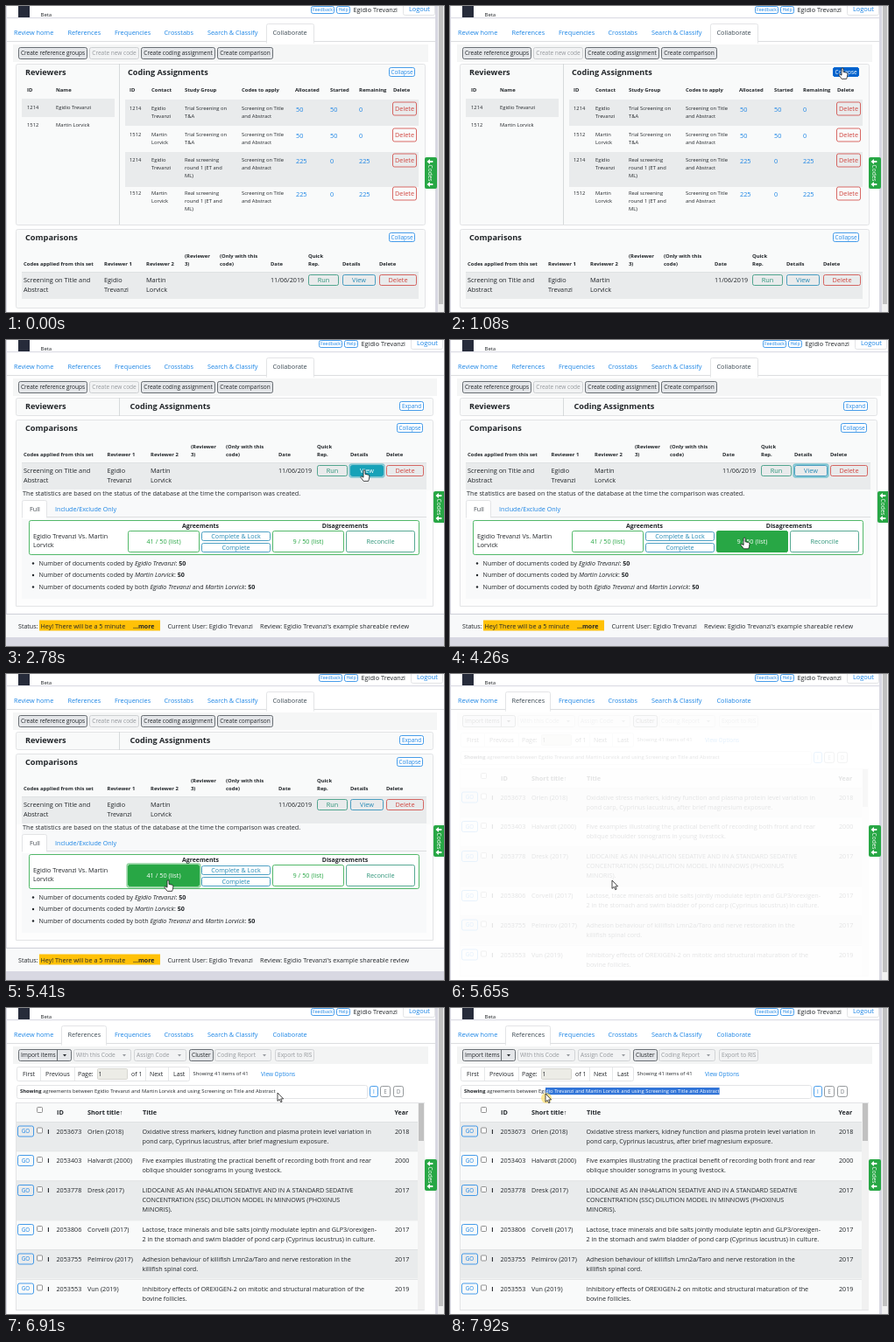
These frames come from a looping animation (500 px wide and 350 px high, 8 s). An HTML page:

```html
<!DOCTYPE html>
<html lang="en">
<head>
<meta charset="utf-8">
<title>Review screens</title>
<style>
html, body { margin: 0; width: 100%; height: 100%; overflow: hidden; background: #d8d8e2; }
svg { display: block; width: 500px; height: 350px; }
text { font-family: "Open Sans", "Noto Sans", sans-serif; white-space: pre; }
</style>
</head>
<body>
<svg id="stage" viewBox="0 0 500 350" xmlns="http://www.w3.org/2000/svg"></svg>
<script>
const INK = '#212529', BLUE = '#1a84e5', TEAL = '#2389b5', GREEN = '#28a745', RED = '#d0453f';
const LINE = '#dcdee0', SHADE = '#e9ebec', PALE = '#f9fafa';
const ANN = ['Egidio', 'Trevanzi'], BOB = ['Martin', 'Lorvick'];
const annName = ANN.join(' '), bobName = BOB.join(' ');
const LOOP = 8000;

// y is the vertical middle of the capitals
const text = (x, y, s, size = 7.3, fill = INK, extra = '') =>
  `<text x="${x}" y="${(y + size * 0.36).toFixed(2)}" font-size="${size}" fill="${fill}" ${extra}>${s}</text>`;
const bold = (x, y, s, size = 5.9, extra = '') => text(x, y, s, size, INK, 'font-weight="700" ' + extra);
const mid = (x, y, s, size, fill) => text(x, y, s, size, fill, 'text-anchor="middle"');
const lines = (x, y, list, gap, size) => list.map((s, i) => text(x, y + i * gap, s, size)).join('');
const rect = (x, y, w, h, fill, stroke = 'none', r = 0) => stroke === 'none'
  ? `<rect x="${x}" y="${y}" width="${w}" height="${h}" rx="${r}" fill="${fill}"/>`
  : `<rect x="${x + .5}" y="${y + .5}" width="${w - 1}" height="${h - 1}" rx="${r}" fill="${fill}" stroke="${stroke}" stroke-width=".8"/>`;
const button = (x, y, w, h, label, color, size = 7.3, fill = '#fff', ink = color) =>
  rect(x, y, w, h, fill, color, 2) + mid(x + w / 2, y + h / 2, label, size, ink);
const solid = (x, y, w, h, label, color, size) => button(x, y, w, h, label, color, size, color, '#fff');
const ring = (x, y, w, h, color) =>
  `<rect x="${x - .8}" y="${y - .8}" width="${w + 1.6}" height="${h + 1.6}" rx="2.6" fill="none" stroke="${color}" stroke-opacity=".5" stroke-width="1.7"/>`;
const caret = (x, y, fill) => `<path d="M${x} ${y}h4l-2 2.4z" fill="${fill}"/>`;
const group = (id, body, extra = '') => `<g id="${id}" ${extra}>${body}</g>`;

const TABS = [['Review home', 9], ['References', 70.5], ['Frequencies', 124], ['Crosstabs', 180.5],
  ['Search &amp; Classify', 230], ['Collaborate', 304.5]];

function chrome(w, active, bottom) {
  const d = w === 500 ? 9 : 0;
  const [tx, tw] = active === 1 ? [63, 52] : [297, 55];
  return rect(0, 0, 500, 350, '#d8d8e2') + rect(1, 0, w - 1, bottom, '#fff')
    + rect(0, 13, w, 1.2, '#dcdce5')
    + rect(14, 0, 13, 13, '#262b3a') + text(39.5, 9.5, 'Beta', 6)
    + button(348 + d, 0, 27, 9, 'Feedback', BLUE, 5.2) + button(377 + d, 0, 16, 9, 'Help', BLUE, 5.2)
    + text(396.5 + d, 4, annName, 7.3)
    + rect(453 + d, -4, 37, 15, '#fff', LINE, 2) + text(460 + d, 3, 'Logout', 7.4, BLUE)
    + rect(1, 40, w - 1, 1, LINE)
    + rect(tx, 20, tw, 24, '#fff', LINE, 2) + rect(tx + 1, 40, tw - 2, 5, '#fff')
    + TABS.map(([s, x], i) => text(x, 30.5, s, 7.3, i === active ? '#3c4a54' : BLUE)).join('');
}

function codesTab(w) {
  const x = w - 12;
  const arrow = y => `<path d="M${x + 2.5} ${y}l3.4-3v2h3.4v2h-3.4v2z" fill="#fff"/>`;
  return rect(x, 173, 14, 36, GREEN, 'none', 2) + arrow(178) + arrow(204)
    + `<g transform="translate(${x + 6.5} 191) rotate(90)">${mid(0, 0, 'Codes', 6.6, '#fff')}</g>`;
}

const scrollbar = rect(493, 0, 7, 350, '#f1f1f1') + rect(494, 0, 5, 341, '#c1c1c1');

function toolbar(w) {
  const b = (x, n, s, on = true) => on
    ? button(x, 47, n, 14, s, '#4a5056', 6.5, '#e4e6e9', INK)
    : button(x, 47, n, 14, s, '#c4c7ca', 6.5, '#f2f3f4', '#94989c');
  return rect(8, 44, w - 16, 20, '#f5f6f6') + b(14, 79, 'Create reference groups') + b(95, 57, 'Create new code', false)
    + b(154, 85, 'Create coding assignment') + b(241, 64, 'Create comparison');
}

function comparisons(xs, y, right) {
  const [codes, r1, r2, r3, only, date, run, view, del] = xs;
  return rect(11, y - 40, right - 3, 91, PALE, LINE, 2) + bold(22, y - 30, 'Comparisons', 9.2)
    + bold(codes, y, 'Codes applied from this set') + bold(r1, y, 'Reviewer 1') + bold(r2, y, 'Reviewer 2')
    + bold(r3, y - 9, '(Reviewer') + bold(r3, y, '3)') + bold(only, y - 9, '(Only with this') + bold(only, y, 'code)')
    + bold(date, y, 'Date') + bold(run, y - 9, 'Quick') + bold(run, y, 'Rep.')
    + bold(view, y, 'Details') + bold(del, y, 'Delete')
    + rect(18, y + 9, right - 18, 31, SHADE) + rect(18, y + 9, right - 18, .7, LINE)
    + lines(codes, y + 18, ['Screening on Title and', 'Abstract'], 11, 7.4)
    + lines(r1, y + 18, ANN, 11) + lines(r2, y + 18, BOB, 11) + text(date, y + 18, '11/06/2019', 7.2)
    + button(run, y + 12, 35, 13, 'Run', '#2c9478', 7.3, 'none') + button(view, y + 12, 38, 13, 'View', TEAL, 7.3, 'none')
    + button(del, y + 12, 43, 13, 'Delete', RED, 7.3, 'none');
}

function assignments() {
  const heads = [['ID', 141], ['Contact', 166], ['Study Group', 204], ['Codes to apply', 269],
    ['Allocated', 330], ['Started', 370], ['Remaining', 403], ['Delete', 442]];
  const trial = ['Trial Screening on', 'T&amp;A'], real = ['Real screening', 'round 1 (ET and', 'ML)'];
  const rows = [
    [107, 30, 117, '1214', ANN, trial, ['50', '50', '0']], [137, 30, 147, '1512', BOB, trial, ['50', '50', '0']],
    [167, 40, 176, '1214', ANN, real, ['225', '0', '225']], [207, 35, 214, '1512', BOB, real, ['225', '0', '225']]];
  let s = rect(11, 66, 468, 185, PALE, LINE, 2) + rect(129, 66, .8, 184, '#cfd2d4')
    + bold(22, 75.5, 'Reviewers', 9.2) + bold(139, 75.5, 'Coding Assignments', 9.15)
    + button(437, 70, 30, 11, 'Collapse', BLUE, 6.4)
    + bold(24, 96, 'ID') + bold(57, 96, 'Name') + rect(18, 106, 106, 21, SHADE)
    + text(24, 115.5, '1214', 5.8) + text(57, 115.5, annName, 5.8)
    + text(24, 136, '1512', 5.8) + text(57, 136, bobName, 5.8);
  s += heads.map(([h, x]) => bold(x, 96, h)).join('');
  rows.forEach(([top, h, y, id, who, study, nums], i) => {
    s += i % 2 ? '' : rect(136, top, 335, h, SHADE);
    s += text(141, y, id, 5.8) + lines(166, y, who, 9, 5.8) + lines(204, y, study, 9, 5.8)
      + lines(269, y, ['Screening on Title', 'and Abstract'], 9, 5.8)
      + nums.map((n, k) => text([331, 370, 403][k], y + 1.5, n, 7.3, BLUE)).join('')
      + button(441, y - 7.5, 28, 16, 'Delete', RED, 7.3, 'none');
  });
  return s;
}

function statusBar(y) {
  return rect(0, y - 14, 500, 27, '#f8f9fa') + rect(0, y - 14, 500, 1, '#cfd0d8')
    + text(14, y, 'Status:', 7.1) + rect(38, y - 6.5, 138, 12, '#ffc107')
    + text(39.5, y, 'Hey! There will be a 5 minute', 7.2) + bold(145, y + .8, '...more', 7)
    + text(184.5, y + .8, 'Current User: ' + annName, 7.25)
    + text(290, y + .8, `Review: ${annName}'s example shareable review`, 7.2);
}

function stats() {
  const it = s => `<tspan font-style="italic">${s}</tspan>`, fifty = ': <tspan font-weight="700">50</tspan>';
  const bullets = [`Number of documents coded by ${it(annName)}${fifty}`, `Number of documents coded by ${it(bobName)}${fifty}`,
    `Number of documents coded by both ${it(annName)} and ${it(bobName)}${fifty}`];
  return rect(1, 172, 498, 142, '#fff')
    + `<path d="M11.5 172V304.5H487.5V172" fill="#fdfdfd" stroke="${LINE}" stroke-width=".8"/>`
    + rect(18, 172, 462, 124, '#f8f9fa')
    + text(19, 175.5, 'The statistics are based on the status of the database at the time the comparison was created.', 7.25)
    + rect(18, 202, 462, 1, LINE) + rect(18, 183, 29, 21, '#fff', LINE, 2) + rect(19, 202, 27, 3, '#fff')
    + text(27, 193, 'Full', 7.3, '#495057') + text(56, 193, 'Include/Exclude Only', 7.2, BLUE)
    + rect(26, 206, 446, 40, '#fff', GREEN, 2)
    + bold(222, 212, 'Agreements', 7, 'text-anchor="middle"') + bold(387, 212, 'Disagreements', 7, 'text-anchor="middle"')
    + lines(31, 224, [annName + ' Vs. ' + BOB[0], BOB[1]], 10.5, 7.2)
    + button(139, 218, 82, 25, '41 / 50 (list)', GREEN) + button(223, 219, 79, 11, 'Complete &amp; Lock', TEAL, 7.15)
    + button(223, 232, 79, 11, 'Complete', TEAL, 7.15) + button(304, 218, 82, 25, '9 / 50 (list)', GREEN)
    + button(388, 218, 79, 25, 'Reconcile', '#2c9478')
    + bullets.map((b, i) => `<circle cx="31" cy="${255.5 + 13.5 * i}" r="1.2" fill="${INK}"/>` + text(37.5, 255 + 13.5 * i, b, 7.15)).join('');
}

const PAPERS = [
  [141, '2053673', 'Orlen (2018)', '2018', ['Oxidative stress markers, kidney function and plasma protein level variation in',
    'pond carp, Cyprinus lacustrus, after brief magnesium exposure.']],
  [174.5, '2053403', 'Halvardt (2000)', '2000', ['Five examples illustrating the practical benefit of recording both front and rear',
    'oblique shoulder sonograms in young livestock.']],
  [208.5, '2053778', 'Dresk (2017)', '2017', ['LIDOCAINE AS AN INHALATION SEDATIVE AND IN A STANDARD SEDATIVE',
    'CONCENTRATION (SSC) DILUTION MODEL IN MINNOWS (PHOXINUS', 'MINORIS).']],
  [253.5, '2053806', 'Corvelli (2017)', '2017', ['Lactose, trace minerals and bile salts jointly modulate leptin and GLP3/orexigen-',
    '2 in the stomach and swim bladder of pond carp (Cyprinus lacustrus) in culture.']],
  [287, '2053755', 'Pelmirov (2017)', '2017', ['Adhesion behaviour of killifish Lmn2a/Taro and nerve restoration in the',
    'killifish spinal cord.']],
  [321, '2053553', 'Vun (2019)', '2019', ['Inhibitory effects of OREXIGEN-2 on mitotic and structural maturation of the',
    'bovine follicles.']]];

const filterText = (id, fill) => text(16, 95.3, `<tspan font-weight="700">Showing</tspan> agreements between ${annName} and `
  + `${bobName} and using Screening on Title and Abstract`, 5.85, fill, `id="${id}"`);

function references() {
  const tool = (x, w, s, on, drop) => rect(x, 47, w, 14, on ? '#e4e6e9' : '#f2f3f4', on ? '#4a5056' : '#c9cccf', 2)
    + text(x + 3, 54, s, 6.6, on ? INK : '#94989c')
    + (drop ? caret(x + w - 10, 53, on ? INK : '#94989c') : '');
  const box = (x, y) => rect(x, y, 7, 7, '#fff', '#777', 1);
  let s = rect(8, 44, 474, 20, '#f3f4f4') + tool(14, 61, 'Import items', true, true) + rect(58, 48, .8, 12, '#4a5056')
    + tool(77, 66, 'With this Code', false, true) + tool(146, 60, 'Assign Code', false, true)
    + tool(209, 28, 'Cluster', true) + tool(238, 65, 'Coding Report', false, true) + tool(307, 45, 'Export to RIS', false)
    + rect(12, 67, 198, 17, '#fff', LINE, 2)
    + [39, 78, 159, 185].map(x => rect(x, 68, .7, 15, LINE)).join('')
    + [['First', 19], ['Previous', 45], ['Page:', 82], ['of 1', 143], ['Next', 164], ['Last', 191]]
      .map(([t, x]) => text(x, 75.5, t, 7)).join('')
    + rect(104, 69, 35, 13, '#ecece6', '#cfcfc8', 1) + text(105.5, 75.5, '1', 7)
    + text(213.5, 74.5, 'Showing 41 items of 41', 5.85) + text(291, 76, 'View Options', 6.4, BLUE)
    + rect(12, 88, 401, 16, '#fff', LINE, 2) + filterText('filter', INK)
    + button(415, 89, 10, 13, 'I', BLUE, 6.3) + button(427, 89, 12, 13, 'E', '#7b8085', 6.3) + button(442, 89, 12, 13, 'D', '#7b8085', 6.3)
    + rect(11, 108, 467, 238, PALE, LINE)
    + box(35, 113) + bold(58, 119, 'ID', 7.3) + bold(93, 119, 'Short title↑', 7.3) + bold(156, 119, 'Title', 7.3) + bold(443.5, 119, 'Year', 7)
    + rect(12, 130, 458, .8, LINE);
  PAPERS.forEach(([y, id, who, year, title], i) => {
    const h = 11 * title.length + 11.5;
    s += (i % 2 ? '' : rect(12, y - 11, 458, h, SHADE)) + rect(12, y - 11, 458, .7, LINE)
      + button(13, y - 6.5, 19, 13, 'GO', BLUE, 6.3, 'none') + box(35, y - 4.5) + bold(47.3, y, 'I', 7)
      + text(57.5, y, id, 7.2) + text(93, y, who, 7.2) + lines(155.5, y, title, 11.2, 7.2) + text(444, y, year, 7.2);
  });
  return s + rect(470, 109, 8, 236, '#f1f1f1') + rect(471, 109, 6, 43, '#c1c1c1');
}

const ARROW = 'M0 0V9.4L2.2 7.4L3.7 10.7L5.1 10.1L3.7 6.9H6.6Z';
const HAND = 'M-1 1Q-1-.3 0-.3T1 1V4.4L4.6 5.2Q6 5.6 5.9 7L5.4 10.2L4.6 12.4H-.8L-4 8.2Q-4.4 7 -3.2 6.8L-1 8.2Z';

const stage = document.getElementById('stage');
stage.innerHTML =
  group('open', chrome(490, 5, 350) + toolbar(490) + assignments()
    + comparisons([20, 112, 160, 204, 244, 302, 345, 384, 426], 295, 471) + button(437, 259, 30, 11, 'Collapse', BLUE, 6.4)
    + scrollbar + codesTab(490))
  + group('colOn', solid(437, 70, 30, 11, 'Collapse', '#007bff', 6.4))
  + group('colDown', solid(437, 70, 30, 11, 'Collapse', '#0062cc', 6.4))
  + group('colRing', ring(437, 70, 30, 11, '#007bff'))
  + group('shut', chrome(500, 5, 340) + toolbar(500)
    + rect(11, 66, 477, 21, PALE, LINE, 2) + rect(129, 66, .8, 21, '#cfd2d4')
    + bold(22, 76, 'Reviewers', 9.2) + bold(141.5, 76, 'Coding Assignments', 9.15)
    + button(449, 70, 28, 11, 'Expand', BLUE, 6.4)
    + comparisons([20, 115.5, 165, 211, 251, 311, 355, 393, 434], 131, 480) + button(446, 95, 30, 11, 'Collapse', BLUE, 6.4))
  + group('short', statusBar(204) + rect(0, 217, 500, 133, '#d8d8e2'))
  + group('stats', stats() + statusBar(327))
  + group('shutCodes', codesTab(500))
  + group('expRing', ring(449, 70, 28, 11, '#007bff'))
  + group('viewOn', solid(393, 143, 38, 13, 'View', '#17a2b8'))
  + group('viewRing', ring(393, 143, 38, 13, '#17a2b8'))
  + group('reconOn', solid(388, 218, 79, 25, 'Reconcile', GREEN))
  + group('nineOn', solid(304, 218, 82, 25, '9 / 50 (list)', GREEN))
  + group('doneOn', solid(223, 232, 79, 11, 'Complete', '#17a2b8', 7.15))
  + group('listOn', solid(139, 218, 82, 25, '41 / 50 (list)', GREEN))
  + group('listRing', ring(139, 218, 82, 25, GREEN))
  + group('refs', chrome(490, 1, 350) + group('refBody', references()) + scrollbar + codesTab(490))
  + group('select', `<clipPath id="cut"><rect id="cutBox" y="91" width="0" height="8.4"/></clipPath>`
    + `<g clip-path="url(#cut)">${rect(12, 91, 400, 8.4, '#3275d8')}${filterText('picked', '#fff')}</g>`)
  + group('halo', '<circle cx="1" cy="5" r="6" fill="#ffdc5e" fill-opacity=".65"/>')
  + group('cursor', '<path id="shape" fill="#fff" stroke="#111" stroke-width=".75" stroke-linejoin="round"/>');
const el = id => document.getElementById(id);

// id, shown from, shown until
const SHOWN = [
  ['open', 0, 1470], ['colOn', 620, 1470], ['colDown', 1080, 1470], ['colRing', 1240, 1470],
  ['shut', 1470, 5580], ['short', 1470, 2780], ['stats', 2780, 5580], ['shutCodes', 1470, 5580], ['expRing', 1470, 2550],
  ['viewOn', 2320, 3250], ['viewRing', 2550, 5410], ['reconOn', 3400, 3780], ['nineOn', 3780, 4560],
  ['doneOn', 4560, 4640], ['listOn', 4640, 5580], ['listRing', 5410, 5580],
  ['refs', 5580, LOOP], ['select', 7390, LOOP], ['halo', 7390, LOOP], ['cursor', 70, LOOP]];
const HANDS = [[620, 1470], [2320, 3250], [3400, 5580]];
// first step, last step, steps, x, y
const MOVES = [
  [70, 700, 9, 448, 71], [1940, 2400, 7, 409, 149], [3180, 3480, 5, 425, 230], [3710, 3940, 4, 340, 227],
  [4260, 4340, 2, 334, 226], [4490, 4800, 5, 185, 236], [6370, 6610, 4, 136, 89], [6690, 6910, 4, 310, 97],
  [6990, 7070, 2, 312, 96], [7220, 7220, 1, 313, 95], [7390, 7920, 8, 109, 98]];

function pointer(t) {
  let x = 458, y = 375;
  for (const [from, to, n, tx, ty] of MOVES) {
    if (t < from) break;
    const k = n > 1 ? Math.floor((t - from) / (to - from) * (n - 1) + 0.01) + 1 : 1;
    const f = 1 - (1 - Math.min(1, k / n)) ** 1.5;
    x += (tx - x) * f;
    y += (ty - y) * f;
  }
  return [x, y];
}

function draw(t) {
  for (const [id, from, to] of SHOWN) el(id).style.display = t >= from && t < to ? '' : 'none';
  const step = Math.max(0, Math.min(5, Math.floor((t - 5570) / 80)));
  el('refBody').setAttribute('opacity', (step / 5) ** 1.3);
  const [x, y] = pointer(t), at = `translate(${x.toFixed(1)} ${y.toFixed(1)})`;
  el('cursor').setAttribute('transform', at);
  el('halo').setAttribute('transform', at);
  el('shape').setAttribute('d', HANDS.some(([a, b]) => t >= a && t < b) ? HAND : ARROW);
  if (t >= 7390) {
    const end = 16 + el('picked').getComputedTextLength();
    el('cutBox').setAttribute('x', x);
    el('cutBox').setAttribute('width', Math.max(0, end - x));
  }
}

const began = performance.now();
function tick() {
  draw((performance.now() - began) % LOOP);
  requestAnimationFrame(tick);
}
tick();
</script>
</body>
</html>
```
